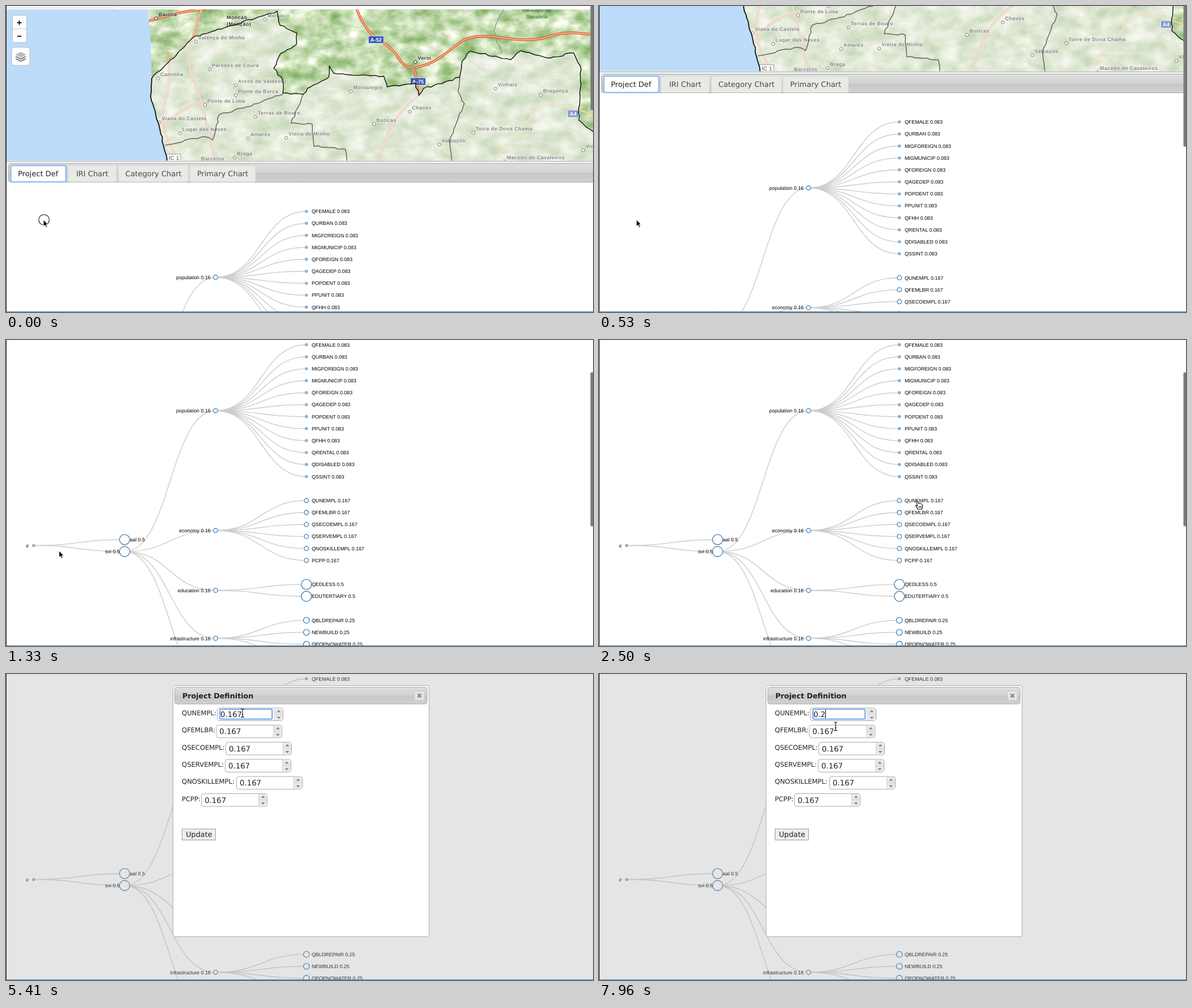
Write an HTML page that moves like this. It is 1035x541 px and loops after 8000 ms.

```html
<!DOCTYPE html>
<html lang="en">
<head>
<meta charset="utf-8">
<title>Project definition</title>
<style>
  html, body { margin: 0; width: 100%; height: 100%; overflow: hidden; background: #fff; }
  svg { display: block; width: 100%; height: 100%; }
  text { white-space: pre; text-rendering: geometricPrecision; }
  .ui { font-family: "DejaVu Sans", Verdana, sans-serif; fill: #222; }
  .tree text { font: 8.9px "Liberation Sans", Helvetica, sans-serif; fill: #000; }
  .place { font: bold 9px "Liberation Sans", Arial, sans-serif; letter-spacing: .4px;
    stroke: #fff; stroke-opacity: .5; stroke-width: 1.6px; paint-order: stroke; }
  .shield { font: bold 9.5px "Liberation Sans", Arial, sans-serif; fill: #fff; text-anchor: middle; }
  .lake { font: italic bold 9px "Liberation Sans", Arial, sans-serif; fill: #4a8558; }
  .line { fill: none; stroke-linejoin: round; stroke-linecap: round; }
</style>
</head>
<body>
<svg id="stage" viewBox="0 0 1035 541" preserveAspectRatio="none" xmlns="http://www.w3.org/2000/svg"></svg>
<script>
const LOOP = 8000;

let seed = 11;
const random = () => (seed = (seed * 16807) % 2147483647) / 2147483647;
const points = s => s.split(' ').map(p => p.split(',').map(Number));
const path = pts => 'M' + pts.map(p => p.map(v => +v.toFixed(1))).join('L');
const rect = (x, y, w, h, attrs = '') => `<rect x="${x}" y="${y}" width="${w}" height="${h}" ${attrs}/>`;
const text = (s, x, y, attrs = '') => `<text x="${x}" y="${y}" ${attrs}>${s}</text>`;
const line = (d, color, width) => `<path class="line" d="${d}" stroke="${color}" stroke-width="${width}"/>`;

// Splits each segment and nudges the inserted points, like a surveyed border.
function rough(s, amp = 3) {
  const pts = points(s), out = [pts[0]];
  for (let i = 1; i < pts.length; i++) {
    const [ax, ay] = pts[i - 1], [bx, by] = pts[i];
    const n = Math.max(1, Math.round(Math.hypot(bx - ax, by - ay) / 7));
    for (let k = 1; k < n; k++)
      out.push([ax + (bx - ax) * k / n + (random() - .5) * amp, ay + (by - ay) * k / n + (random() - .5) * amp]);
    out.push(pts[i]);
  }
  return out;
}

function smooth(s) {
  const p = points(s);
  let d = `M${p[0]}`;
  for (let i = 1; i < p.length - 1; i++)
    d += `Q${p[i]} ${(p[i][0] + p[i + 1][0]) / 2},${(p[i][1] + p[i + 1][1]) / 2}`;
  return d + `L${p[p.length - 1]}`;
}

function road(s, casing, core, width) {
  const d = smooth(s);
  return line(d, casing, width) + line(d, core, width * .45);
}

const shield = (label, x, y, w, fill) =>
  rect(x - w / 2, y - 6.5, w, 13, `fill="${fill}" stroke="#fff" stroke-width=".8"`) +
  text(label, x, y + 3.4, 'class="shield"');

function place(name, x, y, dark) {
  const color = dark ? '#333' : '#858585';
  return `<circle cx="${x - 4}" cy="${y + 4}" r="2.7" fill="#fff" stroke="${color}"/>` +
    text(name, x, y, `class="place" fill="${color}"`);
}

function drawMap() {
  const north = rough('257,128 301,86 329,56 386,38 478,9 483,34 513,48 512,68 484,84 472,110 488,131 488,154 524,156 537,143 569,126 570,106 578,119 608,122 666,124 672,143 722,136 728,158 736,146 800,126 804,98 818,80 890,95 908,79 960,92 1001,83 1014,112 1010,202 1035,222');
  const coast = rough('257,128 255,160 270,212 284,274', 2.5);
  const land = path([[250, 6], [255, 60], ...coast, [1035, 274], [1035, 6]]);
  const region = path([...north, [1035, 274], ...coast.slice().reverse()]);

  const motorway = s => road(s, '#dc5a35', '#f7b488', 4.6);
  const highway = s => road(s, '#e9906f', '#f7cdb2', 3.8);
  const district = s => line(path(rough(s)), '#666', 1.5);

  return `<clipPath id="mapClip">${rect(1, 6, 1034, 267.5)}</clipPath>
    <clipPath id="landClip"><path d="${land}"/></clipPath>
    <filter id="relief" x="0" y="0" width="1" height="1" color-interpolation-filters="sRGB">
      <feTurbulence type="fractalNoise" baseFrequency=".03 .045" numOctaves="5" seed="4"/>
      <feColorMatrix values=".8 0 0 0 .37  .5 0 0 0 .61  .9 0 0 0 .24  0 0 0 0 1"/>
    </filter>
    <g clip-path="url(#mapClip)">
      ${rect(0, 6, 1035, 268, 'fill="#bcdcfa"')}
      <g clip-path="url(#landClip)">
        ${rect(248, 4, 788, 272, 'filter="url(#relief)"')}
        ${line(path(rough('878,4 860,45 874,84', 5)), '#888', 1.1)}
        ${motorway('618,4 632,44 682,75 700,106 722,109 727,156')}
        ${motorway('722,109 745,104 775,85 820,48 925,64 985,45 1036,51')}
        ${motorway('250,27 300,12 352,5')}
        ${highway('345,4 332,48 317,96 345,166 358,230 370,276')}
        ${highway('285,84 292,130 270,205 304,276')}
        ${highway('350,166 310,182 278,212')}
        ${highway('728,158 684,192 656,276')}
        ${road('1036,192 944,162 932,192 856,276', '#e6b878', '#f8e3b4', 3)}
      </g>
      ${shield('A-52', 652.5, 59.5, 27, '#3458b0')}${shield('A-75', 726.5, 133.5, 27, '#3458b0')}
      <path d="${region}" fill="#f0f0ec" opacity=".62"/>
      ${shield('A4', 1000, 190.5, 19, '#8399d0')}
      ${place('Baiona', 269, 18, true)}${place('Verin', 726, 95, true)}
      ${text('Moncao', 389, 23, 'class="place" fill="#333"')}${text('(Monção)', 389, 35, 'class="place" fill="#333"')}
      ${text('del Lago de', 911, 10, 'class="lake"')}${text('Sanabria', 917, 22, 'class="lake"')}
      ${place('Melgaço', 461, 20)}${place('Valença do Minho', 339, 59)}
      ${place('Paredes de Coura', 363, 108)}${place('Caminha', 272, 124)}
      ${place('Arcos de Valdevez', 409, 136)}${place('Ponte da Barca', 409, 154)}
      ${place('Ponte de Lima', 355, 171)}${place('Viana do Castelo', 275, 202)}
      ${place('Lugar das Neves', 311, 221)}${place('Terras de Bouro', 444, 192)}
      ${place('Amares', 431, 230)}${place('Vieira do Minho', 498, 229)}
      ${place('Braga', 407, 264)}${place('Barcelos', 344, 273)}
      ${place('Montalegre', 612, 147)}${place('Boticas', 653, 205)}
      ${place('Chaves', 716, 183)}${place('Valpaços', 768, 241)}
      ${place('Vinhais', 867, 142)}${place('Bragança', 947, 153)}
      ${place('Torre de Dona Chama', 828, 220)}${place('Macedo de Cavaleiros', 883, 271)}
      ${place('Ribeira de Pena', 611, 279)}${place('Vimioso', 1022, 251)}
      ${rect(283, 262, 25, 14, 'fill="#fff" stroke="#999"')}
      ${text('IC 1', 287, 272, 'font-family="Liberation Sans, sans-serif" font-size="10" fill="#555"')}
      ${district('281,246 350,231 364,237 376,192 425,178 488,156')}
      ${district('524,156 503,207 540,209 543,248 598,253 601,276')}
      ${district('800,126 797,150 808,172 782,238 787,276')}
      ${line(path(north), '#111', 1.4)}${line(path(coast), '#111', 1.8)}
    </g>
    ${rect(11.5, 16.5, 25, 48, 'rx="4" fill="#fff" stroke="#bbb"')}
    <path d="M12 40.5H36" stroke="#ccc"/>
    <path d="M19.5 29.5H27.5M23.5 25.5V33.5M20 53.5H27" stroke="#111" stroke-width="1.8"/>
    ${rect(10, 73, 32, 32, 'rx="5" fill="#fff" stroke="#bbb"')}
    ${[8, 4, 0].map(dy => `<path d="M14.5 ${86 + dy}L26 ${80.5 + dy}L37.5 ${86 + dy}L26 ${91.5 + dy}Z"
      fill="${dy ? '#8a8a8a' : '#bcbcbc'}" stroke="#fff" stroke-width="1.2"/>`).join('')}`;
}

function drawTabs() {
  const tab = (label, x, w) => rect(x, 282, w, 29, 'rx="3" fill="#e8eae6" stroke="#d6d6d6"') +
    text(label, x + w / 2, 301, 'class="ui" font-size="13" text-anchor="middle" style="fill:#484848"');
  return `<path d="M2 3.5H193Q196 3.5 196 0M200 0Q200 3.5 203 3.5H302Q305 3.5 305 0" fill="none" stroke="#ccc"/>
    ${rect(1, 273.5, 1034, 5, 'fill="#f3f3f3"')}<path d="M1 274.5H1035" stroke="#aaa"/>
    ${rect(4.5, 278.5, 1034, 33, 'rx="4" fill="url(#bar)" stroke="#aaa"')}
    ${rect(8.5, 282, 97, 29, 'rx="3" fill="#fff" stroke="#94bff5" stroke-width="2.6"')}
    ${text('Project Def', 21, 301, 'class="ui" font-size="13"')}
    ${tab('IRI Chart', 109, 86)}${tab('Category Chart', 198, 124)}${tab('Primary Chart', 324, 116)}`;
}

function drawTree() {
  const column = level => 48.8 + 160.3 * level;
  const rowY = i => 363.1 + 21.18 * i;
  const themes = {
    population: 'QFEMALE QURBAN MIGFOREIGN MIGMUNICIP QFOREIGN QAGEDEP POPDENT PPUNIT QFHH QRENTAL QDISABLED QSSINT',
    economy: 'QUNEMPL QFEMLBR QSECOEMPL QSERVEMPL QNOSKILLEMPL PCPP',
    education: 'QEDLESS EDUTERTIARY',
    infrastructure: 'QBLDREPAIR NEWBUILD QPOPNOWATER QPOPNOSEWER'
  };
  const svi = 17.257, hidden = 29;
  let links = '', nodes = '';
  const link = (level, a, b) => {
    const x0 = column(level), x1 = column(level + 1), m = (x0 + x1) / 2;
    links += line(`M${x0} ${rowY(a)}C${m} ${rowY(a)} ${m} ${rowY(b)} ${x1} ${rowY(b)}`, '#ccc', 1.4);
  };
  const node = (level, row, weight, label, after) => {
    const r = 1.8 + 7.2 * Math.sqrt(Math.max(0, (weight - .083) / .417) ** 1.6);
    nodes += `<circle cx="${column(level)}" cy="${rowY(row)}" r="${r}" fill="#fff" stroke="steelblue" stroke-width="1.35"/>` +
      text(label, column(level) + (after ? 9.2 : -8.6), rowY(row) + 3.1, after ? '' : 'text-anchor="end"');
  };
  link(0, svi - .5, svi - 1);
  link(0, svi - .5, svi);
  link(1, svi, hidden);
  let first = 0;
  for (const [name, words] of Object.entries(themes)) {
    const leaves = words.split(' '), weight = +(1 / leaves.length).toFixed(3);
    const mid = first + (leaves.length - 1) / 2;
    link(1, svi, mid);
    leaves.forEach((leaf, i) => {
      link(2, mid, first + i);
      node(3, first + i, weight, `${leaf} ${weight}`, true);
    });
    node(2, mid, .167, `${name} 0.16`);
    first += leaves.length + 1;
  }
  node(0, svi - .5, 0, 'ir');
  node(1, svi - 1, .5, 'aal 0.5', true);
  node(1, svi, .5, 'svi 0.5');
  return `<g class="tree">${links}${nodes}</g>`;
}

function drawDialog() {
  const fields = { QUNEMPL: 372.5, QFEMLBR: 370.8, QSECOEMPL: 387.5, QSERVEMPL: 386.5, QNOSKILLEMPL: 406.5, PCPP: 344.7 };
  const rows = Object.entries(fields).map(([name, x], i) => {
    const y = 71 + 30.3 * i, b = x + 101;
    return text(name + ':', 310, y + 2, 'font-size="11.6"') +
      rect(x, y - 11, 116, 22.5, 'rx="4" fill="#fff" stroke="#aaa"') +
      `<path d="M${b} ${y - 10.5}h11.5q3 0 3 3v15.5q0 3 -3 3h-11.5z" fill="#e9e9e9"/>` +
      `<path d="M${b} ${y - 10.5}v21.5M${b} ${y}h14.5" stroke="#cfcfcf" fill="none"/>` +
      `<path d="M${b + 4} ${y - 3.5}h7l-3.5 -4zM${b + 4} ${y + 4.5}h7l-3.5 4z" fill="#888"/>` +
      (i ? text('0.167', x + 5.5, y + 5, 'font-size="13.3"') : '');
  }).join('');
  return `<g id="dialog" class="ui">
    ${rect(1, 0, 1034, 541, 'fill="#aaa" opacity=".3"')}
    ${rect(294.5, 20.5, 451.5, 444, 'rx="4" fill="#fff" stroke="#aaa"')}
    ${rect(297.5, 23.5, 445, 29.5, 'rx="4" fill="url(#bar)" stroke="#aaa"')}
    ${text('Project Definition', 311, 43, 'font-size="12.7" font-weight="bold"')}
    ${rect(718, 27.5, 22, 21.5, 'id="closeFocus" rx="3" fill="#fff" stroke="#79aef2" stroke-width="3"')}
    ${rect(720.5, 30, 17, 16.5, 'rx="3" fill="#e6e6e6" stroke="#c6c6c6"')}
    <path id="closeMark" d="M725.8 35.2L732.2 41.6M732.2 35.2L725.8 41.6" stroke-width="2.4"/>
    ${rows}
    ${rect(310.5, 274, 59, 19.5, 'fill="#eee" stroke="#999"')}
    ${text('Update', 317.2, 288, 'font-size="12.8"')}
    <g id="inputFocus">${rect(377.5, 62.5, 91.5, 17, 'rx="2" fill="#fff" stroke="#a9cdfa" stroke-width="3.4"')}
      ${rect(377.5, 62.5, 91.5, 17, 'rx="1.5" fill="#fff" stroke="#6ba3ea" stroke-width="1.6"')}</g>
    <rect id="selection" y="64" height="15" fill="#b3d5fd"/>
    ${text('', 378, 76, 'id="value" font-size="13.3"')}
    <path id="caret" stroke="#000"/>
  </g>`;
}

const cursors = `
  <path id="arrow" d="M0 0V11.6L2.7 9.1L4.7 13.4L6.7 12.5L4.8 8.4H8.2Z" fill="#000" stroke="#fff" stroke-width=".9"/>
  <path id="hand" d="M-4.6 -6.6Q-3.2 -8 -2 -6.4L-.2 -2.8Q3 -4.4 6.1 -1L6.4 3Q6 5 5.2 7.2H-1.6Q-3.2 4 -5.8 1.2Q-5.6 -.6 -2.4 1.2ZM0 2V4.6M2 2V4.6M4 2V4.6" fill="#fff" stroke="#000" stroke-width="1.1" stroke-linejoin="round"/>
  <path id="beam" d="M-3 -7.5Q0 -7.5 0 -5.5Q0 -7.5 3 -7.5M0 -5.5V5.5M-3 7.5Q0 7.5 0 5.5Q0 7.5 3 7.5M-1.5 2.5H1.5" fill="none" stroke="#111" stroke-width="1.1"/>`;

document.getElementById('stage').innerHTML = `
  <defs><linearGradient id="bar" x2="0" y2="1">
    <stop stop-color="#dedede"/><stop offset=".5" stop-color="#d2d2d2"/>
    <stop offset=".5" stop-color="#c7c7c7"/><stop offset="1" stop-color="#d0d0d0"/></linearGradient></defs>
  ${rect(0, 0, 1035, 541, 'fill="#fff"')}
  <g id="page">${drawMap()}${drawTabs()}${drawTree()}</g>
  ${rect(1030.5, 0, 6, 272, 'id="thumb" rx="2" fill="#7c7c7c"')}
  ${drawDialog()}
  <path d="M.5 0V541" stroke="#222"/><path d="M0 540.5H1035" stroke="#3f80b5"/>
  <circle id="ring" r="9.3" fill="none" stroke="#111" stroke-width="1.1"/>${cursors}`;

const $ = id => document.getElementById(id);
const show = (id, on) => $(id).setAttribute('visibility', on ? 'inherit' : 'hidden');
const move = (id, x, y) => $(id).setAttribute('transform', `translate(${x} ${y})`);
const within = (t, a, b) => t >= a && t < b;

// The wheel scroll follows an S-curve, seen in discrete steps.
function scrollAt(t) {
  if (t < 150) return 0;
  if (t >= 1330) return 354.6;
  const step = Math.min(6, Math.floor((t - 150) / 188) + 1);
  return 354.6 / (1 + Math.exp(3.985 - 1.2555 * step));
}

const glides = [
  { start: 1330, steps: 7, x: 564, y: 284 },
  { start: 2500, steps: 1, x: 564, y: 292 },
  { start: 3860, steps: 4, x: 413, y: 69 },
  { start: 4660, steps: 1, x: 417, y: 69 },
  { start: 6010, steps: 5, x: 394, y: 70 },
  { start: 6910, steps: 2, x: 438, y: 71 },
  { start: 7660, steps: 3, x: 410, y: 100 }
];
const STEP = 167;

function pointerAt(t) {
  let x = 66, y = 378;
  for (const g of glides) {
    if (t < g.start) break;
    const p = Math.min(1, (Math.floor((t - g.start) / STEP) + 1) / g.steps);
    const eased = p * p * (3 - 2 * p);
    x += (g.x - x) * eased;
    y += (g.y - y) * eased;
  }
  return { x, y };
}

function cursorKind(t) {
  if (t >= 4360) return 'beam';
  return within(t, 2332, 3860) ? 'hand' : 'arrow';
}

function render(t) {
  const scroll = scrollAt(t);
  move('page', 0, -scroll);
  $('thumb').setAttribute('y', 44 + (scroll - 322) * .41);

  const open = t >= 3260, focused = t >= 4960, typed = t >= 7660;
  show('thumb', !open);
  show('dialog', open);
  show('closeFocus', open && !focused);
  $('closeMark').setAttribute('stroke', focused ? '#888' : '#444');
  show('inputFocus', open && focused);
  $('value').textContent = typed ? '0.2' : '0.167';

  const start = pointerAt(Math.min(t, 6900)).x - 3;
  const selecting = within(t, 6310, 7660);
  show('selection', selecting);
  $('selection').setAttribute('x', start);
  $('selection').setAttribute('width', Math.max(0, 416.2 - start));
  show('caret', within(t, 4960, 5410) || typed);
  $('caret').setAttribute('d', `M${typed ? 399.5 : 416.5} 63.5V78.5`);

  const { x, y } = pointerAt(t), kind = cursorKind(t);
  for (const id of ['arrow', 'hand', 'beam']) show(id, id === kind);
  move(kind, x, y);
  show('ring', t < 150 || within(t, 3100, 3260) || within(t, 4960, 5110) || within(t, 6160, 6910));
  move('ring', kind === 'hand' ? x - 3 : x + 1, kind === 'hand' ? y - 7 : y);
}

function tick() {
  render(performance.now() % LOOP);
  requestAnimationFrame(tick);
}
tick();
</script>
</body>
</html>
```
